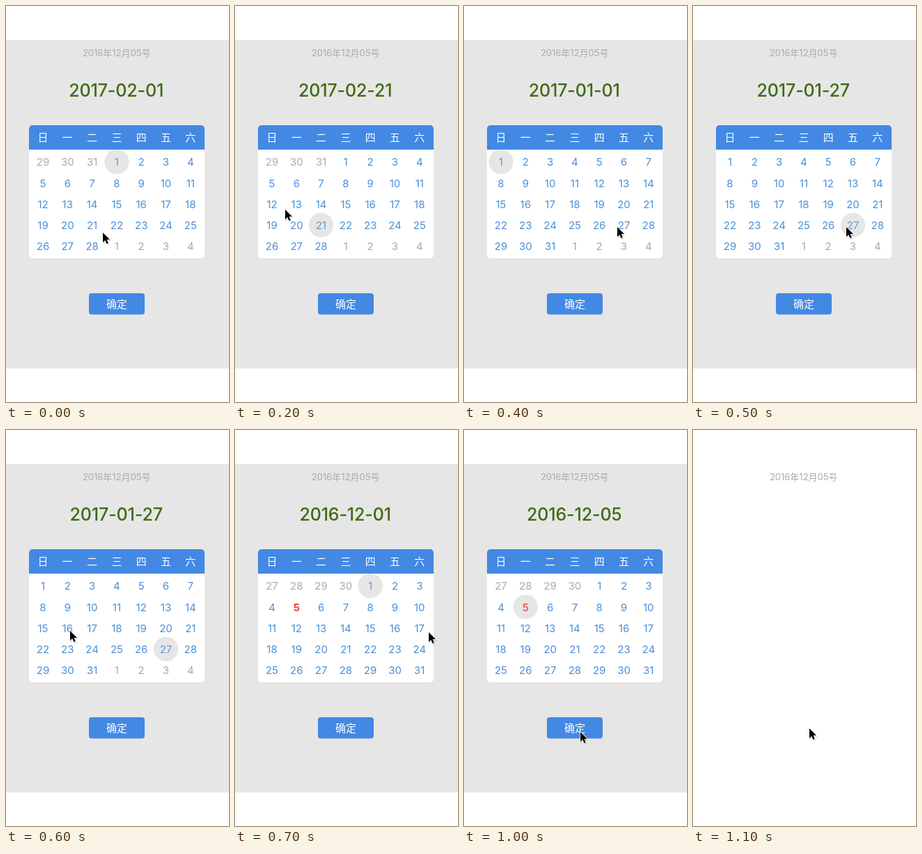
Recreate the animation shown at these times as an HTML page. Size 320x568 px, loop 1.2 s.

```html
<!DOCTYPE html>
<html lang="zh-CN">
<head>
<meta charset="utf-8">
<style>
  html, body { margin: 0; width: 100%; height: 100%; overflow: hidden; background: #fff; }
  svg { display: block; }
  text { font: 15px Inter, "Noto Sans CJK SC", "Noto Sans CJK", sans-serif; text-anchor: middle; fill: #fff; }
  #title { font-size: 13px; fill: #aaa; }
  #date { font-size: 25px; font-weight: 500; letter-spacing: -.15px; fill: #3f6b12; }
  #days text { fill: #4a8fd8; }
  #days .chosen { fill: #6798d4; }
  #days .other { fill: #aaa; }
  #days .today { fill: #e8453c; font-weight: 700; }
  #days .today.chosen { fill: #e25048; font-weight: 500; }
</style>
</head>
<body>
<svg width="320" height="568" viewBox="0 0 320 568">
  <g id="panel">
    <rect y="49" width="320" height="471" fill="#e6e6e6"/>
    <text id="date" x="158.2" y="130"></text>
    <rect x="33" y="171" width="252" height="191" rx="5" fill="#fff"/>
    <path d="M33 206V176a5 5 0 0 1 5-5H280a5 5 0 0 1 5 5V206Z" fill="#4388e3"/>
    <g id="week"></g>
    <circle id="mark" r="17.6" fill="#e6e6e6"/>
    <g id="days"></g>
    <rect x="119" y="412" width="80" height="30.5" rx="4" fill="#4388e3"/>
    <text x="159" y="433">确定</text>
  </g>
  <text id="title" x="158.7" y="72.3">2016年12月05号</text>
  <g id="cursor">
    <path d="M0 0V14L3.2 11 5.4 16 7.8 15 5.6 10H10Z" transform="translate(.8 1.6)" opacity=".2" stroke="#000"/>
    <path d="M0 0V14L3.2 11 5.4 16 7.8 15 5.6 10H10Z" stroke="#fff" stroke-width="1.6" paint-order="stroke"/>
  </g>
</svg>
<script>
  const STEP = 100;
  // Chosen date (null once the panel is dismissed) and pointer tip
  const steps = [
    ['2017-02-01', 139, 325],
    ['2017-02-21', 139, 325],
    ['2017-02-21', 72, 292],
    ['2017-01-01', 278, 300],
    ['2017-01-01', 220, 317],
    ['2017-01-27', 220, 317],
    ['2017-01-27', 92, 288],
    ['2016-12-01', 278, 290],
    ['2016-12-01', 91, 260],
    ['2016-12-05', 91, 260],
    ['2016-12-05', 167, 433],
    [null, 167, 428]
  ];
  const today = '2016-12-05';
  const $ = id => document.getElementById(id);
  const colX = col => 53 + col * 35.3;
  const rowY = row => 223.8 + row * 30.25;

  function addText(parent, x, y, content) {
    const el = document.createElementNS('http://www.w3.org/2000/svg', 'text');
    el.setAttribute('x', x);
    el.setAttribute('y', y);
    el.textContent = content;
    return parent.appendChild(el);
  }

  function place(el, x, y) {
    el.setAttribute('transform', `translate(${x} ${y})`);
  }

  [...'日一二三四五六'].forEach((name, i) => addText($('week'), colX(i), 194.3, name));
  const cells = Array.from({ length: 35 }, (_, i) =>
    addText($('days'), colX(i % 7), rowY(Math.floor(i / 7)) + 5.5, ''));

  function showMonth(chosen) {
    const [year, month, day] = chosen.split('-').map(Number);
    const lead = new Date(year, month - 1, 1).getDay();
    const pick = lead + day - 1;
    $('date').textContent = chosen;
    place($('mark'), colX(pick % 7), rowY(Math.floor(pick / 7)) - 0.3);
    cells.forEach((cell, i) => {
      const date = new Date(year, month - 1, i - lead + 1);
      const inMonth = date.getMonth() === month - 1;
      const isToday = inMonth && chosen.slice(0, 8) + String(date.getDate()).padStart(2, '0') === today;
      cell.textContent = date.getDate();
      cell.setAttribute('class', !inMonth ? 'other' : (isToday ? 'today ' : '') + (i === pick ? 'chosen' : ''));
    });
  }

  let current = -1;
  const start = performance.now();
  function draw() {
    const elapsed = Math.max(0, performance.now() - start);
    const index = Math.floor(elapsed / STEP) % steps.length;
    if (index !== current) {
      current = index;
      const [chosen, x, y] = steps[index];
      $('panel').style.display = chosen ? '' : 'none';
      if (chosen) showMonth(chosen);
      place($('cursor'), x, y);
    }
    requestAnimationFrame(draw);
  }
  draw();
</script>
</body>
</html>
```
